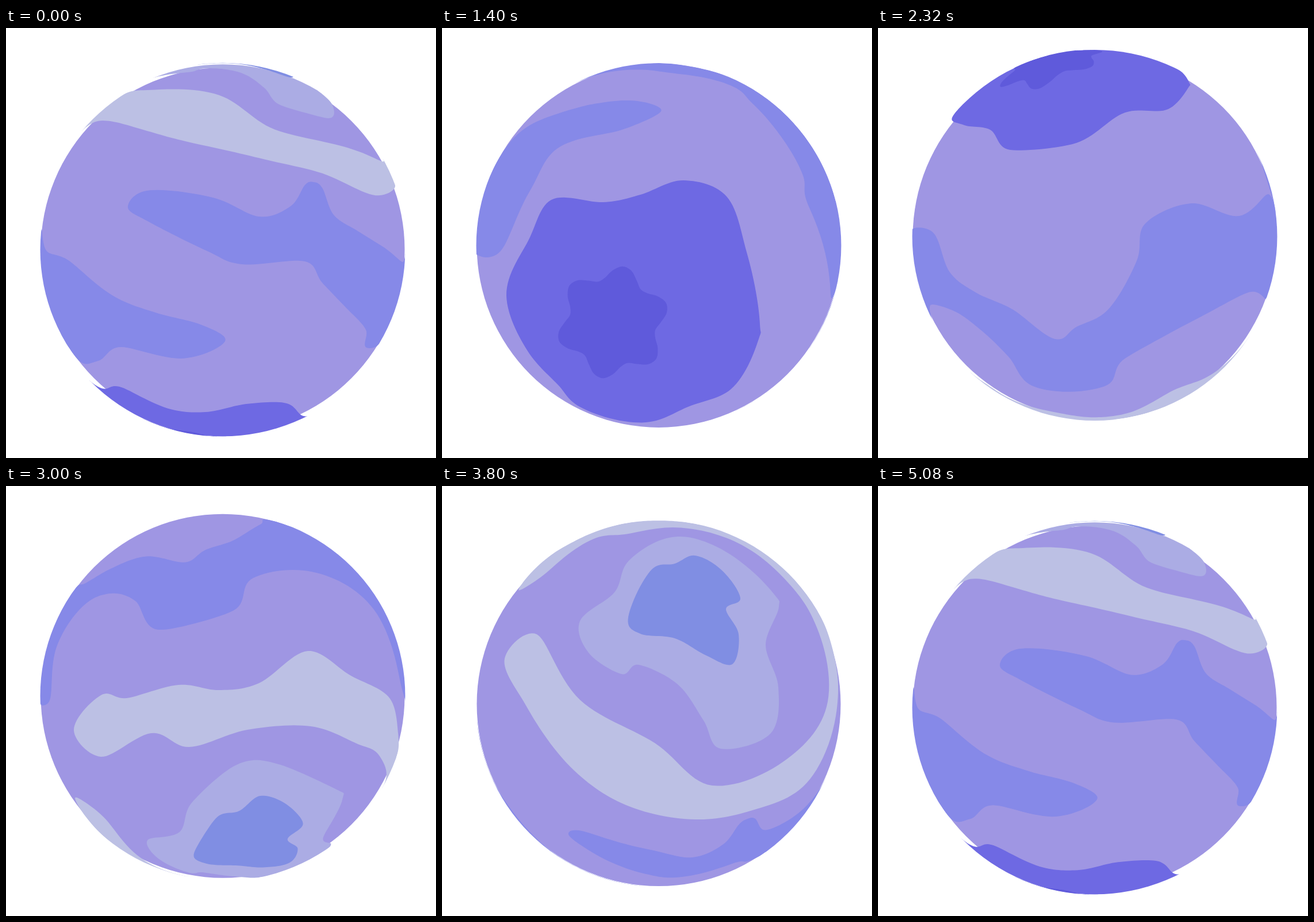
An HTML page with a canvas for the animation above (5.12 s loop, 748x748 px).

```html
<!DOCTYPE html>
<html lang="en">
<head>
<meta charset="utf-8">
<title>Planet</title>
<style>
  html, body { margin: 0; width: 100%; height: 100%; overflow: hidden; background: #fff; }
  canvas { display: block; width: 748px; height: 748px; }
</style>
</head>
<body>
<canvas id="stage" width="748" height="748"></canvas>
<script>
const ctx = document.getElementById('stage').getContext('2d');
const LOOP = 5120, STEP = 40;
const CX = 377, CY = 373.5, BOB = 12, RADIUS = 316.5;
const K = 0.17; // sphere radius / camera distance
const RIM_SCALE = Math.sqrt((1 - K) / (1 + K));
const BLUE = '#8689e8';

// Blob with evenly spaced lobes around its edge.
function lobedBlob(cx, cy, radius, depth, lobes, firstLobe) {
  const points = [], count = lobes * 6;
  for (let i = 0; i < count; i++) {
    const a = 2 * Math.PI * i / count;
    const r = radius + depth * Math.cos(lobes * (a - firstLobe));
    points.push(cx + r * Math.cos(a), cy + r * Math.sin(a));
  }
  return points;
}

// Key points of smooth outlines: x,y on the stage, grouped by the time (ms)
// at which that side of the planet faces the viewer.
const patches = [
  { color: BLUE, lift: 1.003, outline: [ // right arm
    [0, 754,385, 690,407, 655,380, 610,352, 570,325, 550,278, 535,268, 520,273, 495,310, 440,328, 360,295,
      245,283, 212,312, 250,338, 350,388, 410,411, 520,406, 550,443, 590,485, 626,525],
    [1400, 640,315, 677,470]] },
  { color: BLUE, lift: 1.003, outline: [ // left arm
    [0, 0,385, 62,350, 70,387, 110,405, 190,468, 260,495],
    [1400, 340,127, 381,145, 310,178, 200,210, 152,285, 102,388, 62,395]] },
  { color: BLUE, lift: 1.003, outline: [ // belt from limb to limb
    [2320, 754,363, 681,290, 628,327, 545,305, 465,340, 450,405, 400,490, 345,520, 308,541, 235,490,
      170,460, 125,425, 95,355, 60,350, 0,363],
    [3000, 75,375, 88,280, 135,208, 182,187, 225,200, 265,250, 395,217, 430,160, 540,151, 640,215, 688,350]] },
  { color: '#bcc0e4', lift: 1.012, outline: [ // pale bands, joined on the right
    [3000, 118,425, 165,364, 210,369, 300,346, 370,355, 440,343, 525,287, 600,330, 668,370, 682,430],
    [3800, 689,360, 640,510, 540,564, 440,580, 320,555, 230,495, 145,380, 109,300, 165,258, 240,372,
      370,447, 470,521, 600,475, 671,375, 645,230],
    [3000, 610,448, 530,418, 420,424, 318,454, 252,430, 165,471]] },
  { color: '#abace4', lift: 1.018, outline: [ // lilac cloud
    [3800, 240,235, 300,185, 325,130, 400,89, 470,102, 575,185, 586,210, 563,275, 585,350, 572,430,
      485,457, 455,408, 410,345, 342,311, 312,327, 255,290]] },
  { color: '#808ee3', lift: 1.026, outline: [ // heart of the cloud
    [3800, 324,228, 365,145, 405,135, 440,121, 485,145, 519,195, 494,214, 516,258, 505,310, 458,294,
      405,265, 345,257]] },
  { color: '#6e69e3', lift: 1.026, outline: [ // dark continent
    [1400, 553,515, 530,390, 495,293, 420,265, 345,290, 280,303, 190,299, 150,370, 112,465],
    [2320, 150,169, 195,177, 230,212, 345,200, 430,147, 505,141, 541,102]] },
  { color: '#5f5adb', lift: 1.028, outline: [ // dark core
    [1400, ...lobedBlob(297, 512, 87, 12, 6, -0.31)]] }
];

function spinAt(ms) {
  const p = ms / LOOP;
  return 2 * Math.PI * p * p * (3 - 2 * p);
}

const centerY = spin => CY + BOB * Math.cos(spin);

function turn([x, y, z], angle) {
  const c = Math.cos(angle), s = Math.sin(angle);
  return [x, y * c + z * s, z * c - y * s];
}

// Perspective inside the rim; the far side continues outside it, stereographically.
function project([x, y, z], rim) {
  const scale = z < K
    ? rim / RIM_SCALE / Math.max(1 + z, 1e-6)
    : rim * Math.sqrt(1 - K * K) / (1 - K * z);
  return [x * scale, y * scale];
}

function unproject(x, y, rim) {
  const r = Math.hypot(x, y);
  if (r > rim) {
    const q = r / rim * RIM_SCALE, z = (1 - q * q) / (1 + q * q);
    const side = Math.sqrt(1 - z * z) / r;
    return [x * side, y * side, z];
  }
  const focal = rim * Math.sqrt(1 - K * K), m = (r / focal) ** 2;
  const z = (m * K + Math.sqrt(Math.max(0, 1 - m * (1 - K * K)))) / (1 + m * K * K);
  const near = (1 - K * z) / focal;
  return [x * near, y * near, z];
}

// Closed Catmull-Rom curve on the unit sphere.
function smooth(points, steps = 14) {
  const n = points.length, curve = [];
  for (let i = 0; i < n; i++) {
    const [a, b, c, d] = [-1, 0, 1, 2].map(o => points[(i + o + n) % n]);
    for (let j = 0; j < steps; j++) {
      const t = j / steps;
      const p = b.map((_, k) => b[k] + t / 2 * (c[k] - a[k]
        + t * (2 * a[k] - 5 * b[k] + 4 * c[k] - d[k] + t * (3 * (b[k] - c[k]) + d[k] - a[k]))));
      const length = Math.hypot(...p);
      curve.push(p.map(v => v / length));
    }
  }
  return curve;
}

function orientation(points) {
  let area = 0;
  points.forEach(([x, y], i) => {
    const [nx, ny] = points[(i + 1) % points.length];
    area += x * ny - nx * y;
  });
  return Math.sign(area);
}

const flatten = (patch, spin) => patch.curve.map(p => project(turn(p, -spin), patch.rim));

for (const patch of patches) {
  const points = [];
  patch.rim = RADIUS * patch.lift;
  for (const [ms, ...xy] of patch.outline) {
    const spin = spinAt(ms), cy = centerY(spin);
    for (let i = 0; i < xy.length; i += 2) {
      points.push(turn(unproject(xy[i] - CX, xy[i + 1] - cy, patch.rim), spin));
    }
  }
  patch.curve = smooth(points);
  patch.facing = orientation(flatten(patch, spinAt(patch.outline[0][0])));
}

function disc(radius) {
  ctx.beginPath();
  ctx.arc(0, 0, radius, 0, 2 * Math.PI);
}

function drawPatch(patch, spin) {
  const points = flatten(patch, spin);
  ctx.save();
  disc(patch.rim);
  ctx.clip();
  ctx.beginPath();
  // A flipped outline encloses the far point, so it bounds a hole.
  if (orientation(points) !== patch.facing) ctx.rect(-1e4, -1e4, 2e4, 2e4);
  points.forEach(([x, y], i) => i ? ctx.lineTo(x, y) : ctx.moveTo(x, y));
  ctx.closePath();
  ctx.fillStyle = patch.color;
  ctx.fill('evenodd');
  ctx.restore();
}

function draw(now) {
  const spin = spinAt(Math.floor(now % LOOP / STEP) * STEP);
  ctx.setTransform(1, 0, 0, 1, 0, 0);
  ctx.fillStyle = '#fff';
  ctx.fillRect(0, 0, 748, 748);
  ctx.translate(CX, centerY(spin));
  disc(RADIUS);
  ctx.fillStyle = '#9f96e3';
  ctx.fill();
  for (const patch of patches) drawPatch(patch, spin);
}

const start = performance.now();
function tick() {
  draw(performance.now() - start);
  requestAnimationFrame(tick);
}
tick();
</script>
</body>
</html>
```
